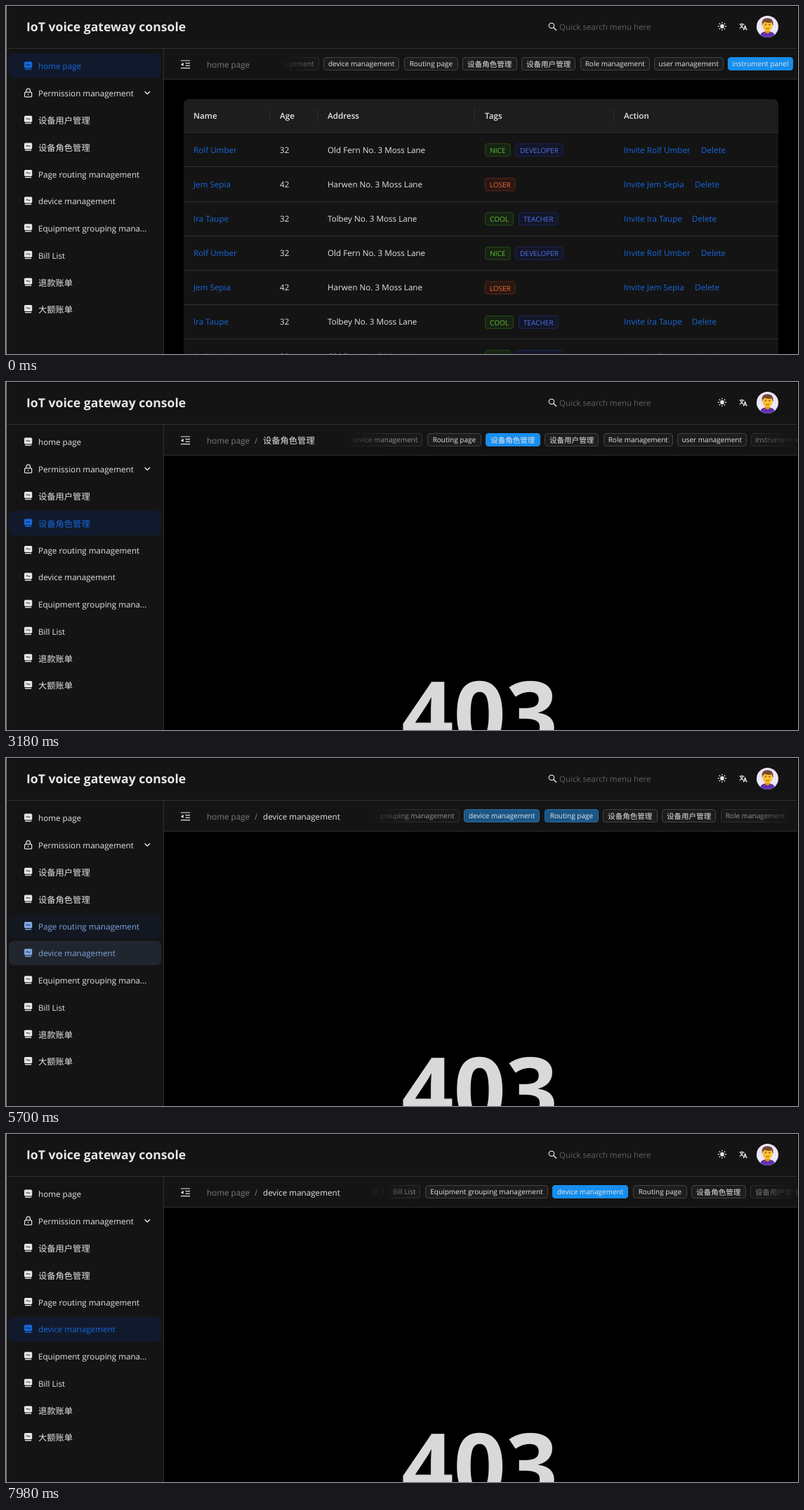
An HTML page for the animation above (8000 ms loop, 1128 by 497 pixels).

```html
<!DOCTYPE html>
<html lang="zh-CN">
<head>
<meta charset="utf-8">
<title>Console</title>
<style>
  html, body { margin: 0; width: 100%; height: 100%; overflow: hidden; background: #000; }
  svg { display: block; }
  text {
    font-family: "Open Sans", "Noto Sans CJK SC", "Noto Sans CJK JP", "Noto Sans CJK", sans-serif;
    text-rendering: geometricPrecision;
    white-space: pre;
  }
</style>
</head>
<body>
<svg id="stage" width="1128" height="497" viewBox="0 0 1128 497">
  <defs>
    <linearGradient id="fadeL"><stop stop-color="#141414"/><stop offset="1" stop-color="#141414" stop-opacity="0"/></linearGradient>
    <linearGradient id="fadeR"><stop stop-color="#141414" stop-opacity="0"/><stop offset="1" stop-color="#141414"/></linearGradient>
    <clipPath id="face"><circle cx="1084.5" cy="29.5" r="15.5"/></clipPath>
  </defs>
</svg>
<script>
const LOOP = 8000, TICK = 60;
const BG = [20, 20, 20], HOVER = [48, 48, 48], PICKED = [17, 26, 44];
const INK = [230, 230, 230], BLUE = [22, 104, 220];
const TAB_BG = [29, 29, 29], TAB_LINE = [66, 66, 66], TAB_ON = [22, 142, 238];
const LINE = '#303030', LIGHT = '#e6e6e6', LINK = '#1668dc';
const TAB_RIGHT = 1126.5, TAB_PAD = 6, EDGE = 60, GAP = 6.5;

const stage = document.getElementById('stage');
const clamp = (v, a = 0, b = 1) => Math.min(b, Math.max(a, v));
const mix = (a, b, k) => a.map((v, i) => v + (b[i] - v) * k);
const rgb = c => `rgb(${c.map(Math.round)})`;
const ease = p => p < 0.5 ? 4 * p ** 3 : 1 - 4 * (1 - p) ** 3;

function set(node, attrs) {
  for (const key in attrs) node.setAttribute(key, attrs[key]);
  return node;
}
function el(parent, tag, attrs = {}) {
  return parent.appendChild(set(document.createElementNS('http://www.w3.org/2000/svg', tag), attrs));
}
const group = (parent, attrs) => el(parent, 'g', attrs);
const rect = (parent, x, y, width, height, fill, more) =>
  el(parent, 'rect', { x, y, width, height, fill, ...more });
const path = (parent, d, more) => el(parent, 'path', { d, fill: 'none', ...more });

// Text centred vertically on cy; Chinese glyphs use a slightly larger size.
function label(parent, x, cy, str, more = {}, size = 11.65) {
  const han = /[\u4e00-\u9fff]/.test(str);
  const node = el(parent, 'text', {
    x, y: cy + size * (han ? 0.4 : 0.365),
    'font-size': han ? size * 1.055 : size, fill: LIGHT, ...more
  });
  node.textContent = str;
  return node;
}

// ---- page content ----
const table = group(stage);
const denied = group(stage);

function tag(x, cy, width, str, [ink, bg, line]) {
  rect(table, x + 0.5, cy - 9, width - 1, 18, bg, { rx: 3.5, stroke: line });
  label(table, x + width / 2, cy + 0.5, str, { fill: ink, 'text-anchor': 'middle' }, 10);
}

function drawTable() {
  const green = ['#6abe39', '#162312', '#274916'];
  const blue = ['#5273e0', '#131629', '#1c2755'];
  const red = ['#e87040', '#2b1611', '#592716'];
  const people = [
    { name: 'Rolf Umber', age: 32, home: 'Old Fern No. 3 Moss Lane', del: 990,
      tags: [[682, 36.5, 'NICE', green], [725.5, 68, 'DEVELOPER', blue]] },
    { name: 'Jem Sepia', age: 42, home: 'Harwen No. 3 Moss Lane', del: 981,
      tags: [[682, 43.5, 'LOSER', red]] },
    { name: 'Ira Taupe', age: 32, home: 'Tolbey No. 3 Moss Lane', del: 977,
      tags: [[682, 41, 'COOL', green], [730, 56.5, 'TEACHER', blue]] }
  ];
  rect(table, 253, 133, 847, 380, '#141414', { rx: 7 });
  path(table, 'M253 181V140a7 7 0 0 1 7-7H1093a7 7 0 0 1 7 7V181Z', { fill: '#1d1d1d' });
  const heads = { 267: 'Name', 390: 'Age', 458: 'Address', 682: 'Tags', 880: 'Action' };
  for (const x in heads) label(table, x, 157, heads[x], { 'font-weight': 600 });
  for (const x of [375.5, 443, 667, 865]) rect(table, x, 147, 1, 20, LINE);
  for (let i = 0; i < 7; i++) {
    const cy = 205.3 + 49.17 * i, p = people[i % 3];
    rect(table, 253, Math.round(180.3 + 49.17 * i), 847, 1, LINE);
    label(table, 267, cy, p.name, { fill: LINK });
    label(table, 390, cy, p.age);
    label(table, 458, cy, p.home);
    for (const [x, w, str, tone] of p.tags) tag(x, cy + 0.4, w, str, tone);
    label(table, 880, cy, 'Invite ' + p.name, { fill: LINK });
    label(table, p.del, cy, 'Delete', { fill: LINK });
  }
}
drawTable();
set(label(denied, 674.5, 0, '403', { 'font-weight': 700, 'text-anchor': 'middle', fill: '#d9d9d9' }, 130), { y: 521 });

// ---- tab strip ----
rect(stage, 225, 61, 902, 43, '#141414');
const strip = group(stage);
const tabs = [
  ['大额账单', 56.2], ['退款账单', 56.2], ['Bill List', 46.2],
  ['Equipment grouping management', 174.9], ['device management', 108.2],
  ['Routing page', 76.7], ['设备角色管理', 77.5], ['设备用户管理', 77.2],
  ['Role management', 98.6], ['user management', 98.6], ['instrument panel', 92.5]
].map(([name, width]) => {
  const node = group(strip);
  const box = rect(node, 0.5, 73.5, Math.round(width) - 1, 18, '#1d1d1d', { rx: 3.5 });
  label(node, width / 2, 82.8, name, { 'text-anchor': 'middle' }, 10);
  return { node, box, width };
});
let total = 0;
for (const tab of tabs) {
  tab.start = total;
  total += tab.width + GAP;
}
total -= GAP;
const cover = rect(stage, 225, 62, 0, 41, '#141414');
const fadeL = rect(stage, 0, 62, EDGE, 41, 'url(#fadeL)');
const fadeR = rect(stage, TAB_RIGHT - EDGE, 62, EDGE, 41, 'url(#fadeR)');
rect(stage, 1127, 0, 1, 497, '#000');

path(stage, 'M249 78H262M255.5 81.6H262M255.5 85.2H262M249 88.6H262', { stroke: LIGHT, 'stroke-width': 1.2 });
path(stage, 'M249 83.4L252.6 80.8V86Z', { fill: LIGHT });
label(stage, 286, 83.3, 'home page', { fill: '#7d7d7d' });
const slash = label(stage, 354, 83.3, '/', { fill: '#7d7d7d' });
const crumb = group(stage);

// ---- header ----
rect(stage, 1, 1, 1126, 59, '#141414');
label(stage, 29, 30, 'IoT voice gateway console', { 'font-weight': 700 }, 17.6);
el(stage, 'circle', { cx: 777, cy: 28, r: 3.7, fill: 'none', stroke: LIGHT, 'stroke-width': 1.2 });
path(stage, 'M779.8 30.8L784 35', { stroke: LIGHT, 'stroke-width': 1.4 });
label(stage, 788, 30, 'Quick search menu here', { fill: '#606060' }, 11.5);

el(stage, 'circle', { cx: 1020, cy: 29, r: 2.9, fill: LIGHT });
for (let a = 0; a < 360; a += 45)
  path(stage, 'M1020 24.8V23', { stroke: LIGHT, 'stroke-width': 1.3, transform: `rotate(${a} 1020 29)` });
path(stage, 'M1044.5 26H1051.5M1048 24.5V26M1050 26Q1048.5 30 1044.8 32M1046 26.5Q1047.5 30 1050 31.5M1050 34.5L1052.6 28.4L1055.2 34.5M1051 32.6H1054.3',
  { stroke: LIGHT, 'stroke-width': 1.2 });

function drawAvatar() {
  const g = group(stage, { 'clip-path': 'url(#face)' });
  rect(g, 1068, 13, 33, 33, '#eee6fb');
  path(g, 'M1073 46Q1074 37 1081 36.5H1088Q1095 37 1096 46Z', { fill: '#5e35b1' });
  path(g, 'M1081 33H1088V37.5Q1084.5 41 1081 37.5Z', { fill: '#e59600' });
  el(g, 'ellipse', { cx: 1084.5, cy: 28, rx: 7, ry: 8, fill: '#fbc02d' });
  path(g, 'M1076.6 28Q1075 17.5 1084 17.2Q1094 17 1092.5 28Q1091 25.5 1090.5 23.5Q1084 25 1081 22.5Q1078 24 1076.6 28Z', { fill: '#7b4a2d' });
  path(g, 'M1081 26.5h1.6M1086.6 26.5h1.6', { stroke: '#4a2f1c', 'stroke-width': 1.5 });
  path(g, 'M1082.3 32Q1084.5 33.2 1086.7 32', { stroke: '#7b4a2d' });
}
drawAvatar();

// ---- side menu ----
rect(stage, 1, 61, 223, 436, '#141414');
const rows = [
  'home page', 'Permission management', '设备用户管理', '设备角色管理', 'Page routing management',
  'device management', 'Equipment grouping mana...', 'Bill List', '退款账单', '大额账单'
].map((name, i) => {
  const cy = 86 + 38.6 * i;
  const box = rect(stage, 4, Math.round(cy - 17.6), 217, 35, '#141414', { rx: 7 });
  const ink = group(stage);
  if (i === 1) {
    rect(ink, 26.6, cy - 1.4, 10, 6.6, 'none', { rx: 1, stroke: LIGHT, 'stroke-width': 1.2 });
    path(ink, `M28.8 ${cy - 1.4}v-2.2a2.8 2.8 0 0 1 5.6 0v2.2M31.6 ${cy + 1}v2`, { stroke: LIGHT, 'stroke-width': 1.2 });
    path(ink, `M197.6 ${cy - 2.6}l3.7 3.7l3.7 -3.7`, { stroke: LIGHT, 'stroke-width': 1.5 });
  } else {
    rect(ink, 26, cy - 6.4, 11.2, 9, 'currentColor', { rx: 1.6 });
    rect(ink, 27, cy + 3.6, 9.2, 1.4, 'currentColor');
    path(ink, `M28.5 ${cy - 1.6}q1.5 -1.8 3 -.3t3 -.3`, { stroke: '#141414', 'stroke-width': 0.9 });
  }
  label(ink, 46, cy + 0.2, name, { fill: 'currentColor' });
  return { box, ink };
});

rect(stage, 1, 60, 1126, 1, LINE);
rect(stage, 224, 61, 1, 436, LINE);
rect(stage, 225, 104, 902, 1, LINE);
rect(stage, 0, 0, 1, 497, '#8c8c8c');

// ---- timeline ----
// at: click, roll: strip starts to scroll, end: right edge of the breadcrumb
const visits = [
  { at: -2000, roll: -2000, row: 0, tab: 10, name: '', end: 348 },
  { at: 1800, roll: 1895, row: 2, tab: 7, name: '设备用户管理', end: 440 },
  { at: 3000, roll: 3120, row: 3, tab: 6, name: '设备角色管理', end: 440 },
  { at: 4320, roll: 4335, row: 4, tab: 5, name: 'Page routing management', end: 511 },
  { at: 5640, roll: 5730, row: 5, tab: 4, name: 'device management', end: 476 },
  { at: 6480, roll: 6570, row: 6, tab: 3, name: 'Equipment grouping management', end: 553 },
  { at: 7500, roll: 7590, row: 5, tab: 4, name: 'device management', end: 476 }
];
const hovers = [[2, 1500, 1800], [3, 2460, 3000], [4, 4020, 4320], [5, 5220, 5640], [6, 6240, 6480], [5, 7200, 7500]];
const ROLL = 540, FADE = 240;

visits.forEach((v, i) => {
  const prev = visits[i - 1], tab = tabs[v.tab];
  v.left = v.end + 43.5;
  v.to = clamp((v.left + TAB_RIGHT) / 2 - tab.start - tab.width / 2, TAB_RIGHT - TAB_PAD - total, v.left);
  v.from = prev ? prev.to + v.end - prev.end : v.to;
  v.crumb = label(crumb, 366, 83.3, v.name);
});

// How strongly item n is chosen, fading from the previous visit to the current one.
function chosen(t, n, what) {
  const k = visits.findLastIndex(v => t >= v.at);
  const now = visits[k], prev = visits[k - 1];
  const p = clamp((t - now.at + TICK) / FADE);
  return (now[what] === n ? p : 0) + (prev && prev[what] === n ? 1 - p : 0);
}

function hoverOf(t, n) {
  const spell = hovers.find(([row, on, off]) => row === n && t >= on && t < off + FADE);
  return spell ? clamp((t - spell[1] + TICK) / 120) : 0;
}

function drawMenu(t) {
  rows.forEach(({ box, ink }, i) => {
    const s = chosen(t, i, 'row');
    set(box, { fill: rgb(mix(mix(BG, HOVER, hoverOf(t, i)), PICKED, s)) });
    ink.style.color = rgb(mix(INK, BLUE, s));
  });
}

function drawTabs(t) {
  const v = visits.findLast(x => t >= x.at);
  const origin = v.from + (v.to - v.from) * ease(clamp((t - v.roll) / ROLL));
  const moreL = clamp((v.left - origin) / 20);
  const moreR = clamp((origin + total + TAB_PAD - TAB_RIGHT) / 20);
  tabs.forEach(({ node, box, start, width }, i) => {
    const x = origin + start, s = chosen(t, i, 'tab');
    const nearL = moreL * clamp((v.left + EDGE - x) / 10);
    const nearR = moreR * clamp((x + width - TAB_RIGHT + EDGE) / 10);
    set(node, { transform: `translate(${Math.round(x)} 0)`, opacity: 1 - 0.4 * Math.max(nearL, nearR) * (1 - s) });
    set(box, { fill: rgb(mix(TAB_BG, TAB_ON, s)), stroke: rgb(mix(TAB_LINE, TAB_ON, s)) });
  });
  set(cover, { width: v.left - 225 });
  set(fadeL, { x: v.left, opacity: moreL });
  set(fadeR, { opacity: moreR });
  set(slash, { opacity: v.name ? 1 : 0 });
  for (const x of visits) set(x.crumb, { opacity: x === v ? 1 : 0 });
}

function draw(t) {
  drawMenu(t);
  drawTabs(t);
  const gone = t - visits[1].at - TICK;
  set(table, { opacity: 1 - clamp(gone / 180) });
  set(denied, { opacity: clamp((gone - 180) / 180) });
}

function frame() {
  const t = performance.now() % LOOP;
  draw(Math.floor(t / TICK) * TICK);
  requestAnimationFrame(frame);
}
frame();
</script>
</body>
</html>
```
